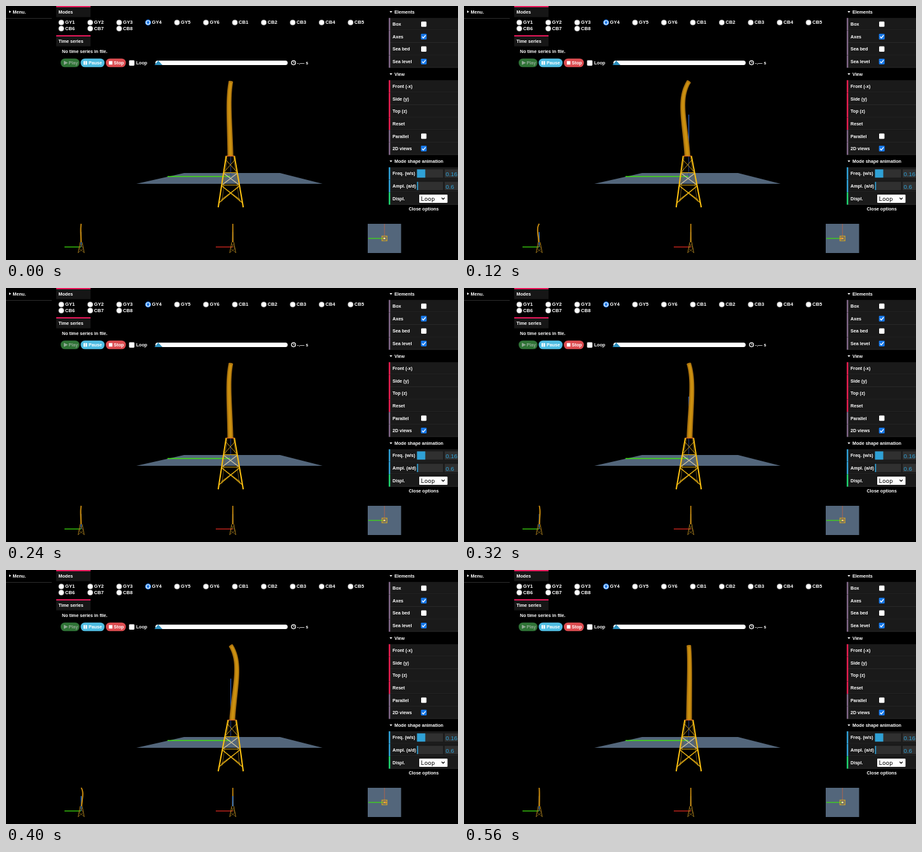
An HTML page for the animation above (600 ms loop, 711 px wide and 400 px high).

```html
<!DOCTYPE html>
<html lang="en">
<head>
<meta charset="utf-8">
<title>Mode shape viewer</title>
<style>
  html, body { margin: 0; width: 100%; height: 100%; overflow: hidden; background: #000; }
  svg { display: block; width: 711px; height: 400px; }
  text { font: bold 7.15px "Liberation Sans", Arial, sans-serif; fill: #fff; white-space: pre; }
  .mode { font-size: 7.6px; }
  .value { font: 9.5px "Liberation Sans", Arial, sans-serif; fill: #2fa1d6; }
  .pick { font: 9.2px "DejaVu Sans Mono", monospace; fill: #000; }
</style>
</head>
<body>
<svg id="stage" viewBox="0 0 711 400" xmlns="http://www.w3.org/2000/svg">
  <g id="ui"></g>

  <g id="scene" fill="none">
    <path d="M280 263H431L498 280H205Z" fill="#53667b"/>
    <path d="M254 268.5H353" stroke="#3fe010" stroke-width="1.4"/>
    <path d="M353.6 171V236" stroke="#2a66d4" stroke-width="1.1"/>
    <path d="M353.6 236V268" stroke="#2b4690" stroke-width=".9"/>
    <g id="tower"></g>
    <g id="jacket"></g>
  </g>

  <g id="views" fill="none">
    <path d="M92 379.5H118" stroke="#3fe010" stroke-width="1.2"/>
    <path d="M118.3 356V379" stroke="#2473d8" stroke-width="1.3"/>
    <path d="M330 379.5H357" stroke="#e02a22" stroke-width="1.2"/>
    <path id="sideAxis" d="M356.7 356V372" stroke="#2473d8" stroke-width="1.6"/>
    <g id="sideTower"></g>
    <g id="frontTower"></g>
    <rect x="569" y="343" width="52.5" height="46" fill="#53667b"/>
    <path d="M570 366H595" stroke="#3fe010" stroke-width="1.2"/>
    <path d="M595.3 343V366" stroke="#a86450" stroke-width="1"/>
    <rect x="591.3" y="362.3" width="8" height="7.5" stroke="#d8a820" stroke-width="1"/>
    <path d="M591 362L600 370M600 362L591 370" stroke="#d8a020" stroke-width=".6"/>
    <ellipse id="topTower" cx="595.3" cy="366" ry="1.6" fill="#d8962a"/>
    <circle id="topCap" cx="595.3" cy="366" r="1.3" fill="#fff2c8"/>
  </g>
</svg>

<script>
const $ = id => document.getElementById(id);
const rect = (x, y, w, h, fill, r = 0) =>
  `<rect x="${x}" y="${y}" width="${w}" height="${h}" rx="${r}" fill="${fill}"/>`;
const text = (x, y, s, attr = '') => `<text x="${x}" y="${y}" ${attr}>${s}</text>`;
const shape = (d, fill) => `<path d="${d}" fill="${fill}"/>`;
const line = (d, color, w = 1) => `<path d="${d}" fill="none" stroke="${color}" stroke-width="${w}"/>`;

function checkbox(x, y, on) {
  return on
    ? rect(x, y, 9, 9, '#1678ea', 1.3) + line(`M${x + 1.8} ${y + 4.6}l2 2.1l3.6-4.4`, '#fff', 1.3)
    : rect(x + .3, y + .3, 8.4, 8.4, '#fff', 1.3);
}

function radio(i, label) {
  const x = 87 + i % 11 * 45.5, y = i < 11 ? 26 : 35.6;
  const on = label === 'GY4', ring = on ? '#1678ea' : '#999';
  return `<circle cx="${x}" cy="${y}" r="4.1" fill="#fff" stroke="${ring}" stroke-width="${on ? 1.1 : .7}"/>` +
    (on ? `<circle cx="${x}" cy="${y}" r="2.4" fill="${ring}"/>` : '') +
    text(x + 6, y + 2.3, label, 'class="mode"');
}

const tab = (y, label) =>
  rect(79, y, 54, 17.5, '#161616') + rect(79, y, 54, 2, '#e6185a') + text(82.5, y + 12.2, label);

const button = (x, w, fill, label, ink = '#fff') =>
  rect(x, 82.7, w, 13.6, fill, 6.5) + text(x + 12.5, 92, label, `style="fill:${ink}"`);

function toolbar() {
  const modes = 'GY1 GY2 GY3 GY4 GY5 GY6 CB1 CB2 CB3 CB4 CB5 CB6 CB7 CB8'.split(' ');
  return shape('M5 7L8 9L5 11Z', '#fff') + text(10.5, 11.6, 'Menu.') + rect(0, 19, 72, 1, '#2c2c2c') +
    tab(0, 'Modes') + tab(46, 'Time series') +
    modes.map((m, i) => radio(i, m)).join('') +
    text(88, 74, 'No time series in file.') +
    button(86, 29.5, '#2f7336', 'Play', '#8fa893') + shape('M91 86.3L97.5 89.5L91 92.7Z', '#8fa893') +
    button(117.5, 37.5, '#4fbde2', 'Pause') + rect(122, 86.7, 5.5, 5.8, '#fff') + rect(124.3, 86.7, .9, 5.8, '#4fbde2') +
    button(157, 31.5, '#dc4c50', 'Stop') + rect(161.8, 86.7, 5.6, 5.6, '#fff') +
    checkbox(193.3, 85.2, false) + text(204.7, 92, 'Loop') +
    rect(235, 86, 208, 7, '#fff', 3.5) + shape('M233.5 93L239.5 86L246 93Z', '#2c8fbd') +
    '<circle cx="452.3" cy="89.3" r="3.2" fill="none" stroke="#fff" stroke-width="1.3"/>' +
    line('M452.3 87.2V89.5H454', '#fff', .8) + text(458, 92, '-.— s');
}

// Option rows: [label, kind, state]
const rows = [
  ['Elements'], ['Box', 'bool', 0], ['Axes', 'bool', 1], ['Sea bed', 'bool', 0], ['Sea level', 'bool', 1],
  ['View'], ['Front (-x)', 'call'], ['Side (y)', 'call'], ['Top (z)', 'call'], ['Reset', 'call'],
  ['Parallel', 'bool', 0], ['2D views', 'bool', 1],
  ['Mode shape animation'], ['Freq. (w/s)', 'num', 13, '0.16'], ['Ampl. (a/d)', 'num', 1.7, '0.6'],
  ['Displ.', 'list']
];
const edge = { bool: '#806787', call: '#e61d4f', num: '#2fa1d6', list: '#1ed36f' };

function row([label, kind, state, value], i) {
  const mid = 9 + i * 19.6, top = mid - 9.8;
  if (!kind) return shape(`M603.4 ${mid - 1}h4.2l-2.1 2.8z`, '#fff') + text(611, mid + 2.6, label);
  let out = rect(602, top, 109, 19.6, '#1a1a1a') + rect(602, top + 18.8, 109, .8, '#2c2c2c') +
    rect(602, top, 2.4, 19.6, edge[kind]) + text(608, mid + 2.6, label);
  if (kind === 'bool') out += checkbox(652.7, mid - 4.5, state);
  if (kind === 'num') out += rect(646.5, mid - 6.5, 41, 13, '#303030') +
    rect(646.5, mid - 6.5, state, 13, '#2fa1d6') + rect(690, mid - 6.5, 21, 13, '#303030') +
    text(691.5, mid + 4.3, value, 'class="value"');
  if (kind === 'list') out += rect(650, mid - 6, 44.5, 13, '#fff', 1) +
    text(652.5, mid + 4, 'Loop', 'class="pick"') + line(`M685.3 ${mid - 1}l2.3 2.4l2.3-2.4`, '#000', 1.2);
  return out;
}

$('ui').innerHTML = toolbar() + rows.map(row).join('') +
  text(657, 322.4, 'Close options', 'text-anchor="middle"');

// Small lattice base for the side views
for (const x of [118.3, 356.7]) {
  $('views').insertAdjacentHTML('beforeend',
    line(`M${x - 1.6} 372L${x - 4.8} 389M${x + 1.6} 372L${x + 4.8} 389`, '#b98a20', .9) +
    line(`M${x - 2} 374L${x + 3.5} 382L${x - 4.5} 388M${x + 2} 374L${x - 3.5} 382L${x + 4.5} 388`, '#94701c', .7));
}

// Second bending mode: the foot sways a little, the middle bulges, the top stays
const sway = .23;
const bend = u => sway * (1 - u) + .88 * u ** 1.2 * (1 - u ** 4) / .495;

// A strip along the bent tower, from side l to side r (-1..1 of its radius)
function strip(t, amp, l, r) {
  const n = 28, left = [], right = [];
  const x = u => t.x + amp * bend(u);
  for (let i = 0; i <= n; i++) {
    const u = i / n, y = t.foot - u * (t.foot - t.top);
    const a = Math.max(0, u - .01), b = Math.min(1, u + .01);
    const dx = x(b) - x(a), dy = (a - b) * (t.foot - t.top), len = Math.hypot(dx, dy);
    const w = t.r0 + (t.r1 - t.r0) * u;
    const at = s => (x(u) - s * w * dy / len).toFixed(2) + ' ' + (y + s * w * dx / len).toFixed(2);
    left.push(at(l));
    right.unshift(at(r));
  }
  return 'M' + left.concat(right).join('L') + 'Z';
}

const bands = [[-1, 1, '#8f5f0e'], [-.8, .8, '#b37a10'], [-.4, .5, '#cc910f']];
const drawTower = (id, t, amp) =>
  $(id).innerHTML = bands.map(([l, r, c]) => shape(strip(t, amp, l, r), c)).join('');

// Lattice base: legs fixed at the bottom, pushed sideways by the tower at the top
function jacket(amp) {
  const at = (side, y, k = 1) => {
    const h = (317 - y) / 81;
    return `${(353.5 + side * k * (19.7 - 13.3 * h) + sway * amp * h ** 1.5).toFixed(2)} ${y}`;
  };
  const bar = (y0, s0, y1, s1, k) => `M${at(s0, y0, k)}L${at(s1, y1, k)}`;
  const cross = (y0, y1, k) => bar(y0, -1, y1, 1, k) + bar(y0, 1, y1, -1, k);
  const legs = k => bar(236, -1, 317, -1, k) + bar(236, 1, 317, 1, k);
  return line(bar(236, -1, 308, -1, .75) + bar(236, 1, 308, 1, .75), '#86661a', .8) +
    line(cross(285, 305, .85), '#c4931a', 1) +
    line(cross(264, 281, .9), '#cfc29c', 1.3) +
    line(cross(242, 262, 1), '#c4951a', 1) +
    line(bar(262.5, -1, 262.5, 1) + bar(282, -1, 282, 1) + cross(283, 310, 1), '#ecb411', 1.2) +
    line(legs(1), '#fcc011', 2) +
    line(bar(236.3, -1, 236.3, 1), '#d8641c', 1.3);
}

const main = { x: 353.7, foot: 236, top: 119, r0: 4.7, r1: 3.6 };
const side = { x: 118.3, foot: 372, top: 343, r0: 1.2, r1: .9 };
const front = { x: 356.7, foot: 372, top: 343, r0: 1.1, r1: .8 };

function draw(now) {
  const t = Math.floor(now % 600 / 40) * 40;
  const s = -Math.sin((t / 600 + .048) * 2 * Math.PI);
  drawTower('tower', main, 10 * s);
  $('tower').insertAdjacentHTML('beforeend',
    `<ellipse cx="${main.x}" cy="119.3" rx="3.4" ry="1.3" fill="#b0760f" transform="rotate(${-35 * s} ${main.x} 119.3)"/>`);
  $('jacket').innerHTML = jacket(10 * s);
  drawTower('sideTower', side, 2.6 * s);
  drawTower('frontTower', front, 0);
  // The axis shows in front once the tower leans away
  $('views').insertBefore($('sideAxis'), s > .6 ? $('topTower') : $('sideTower'));
  $('topTower').setAttribute('rx', 1.8 + 1.6 * Math.abs(s));
  $('topTower').setAttribute('cx', 595.3 + 1.2 * s);
  $('topCap').setAttribute('r', 1.4 - .9 * Math.abs(s));
  requestAnimationFrame(draw);
}
draw(performance.now());
</script>
</body>
</html>
```
